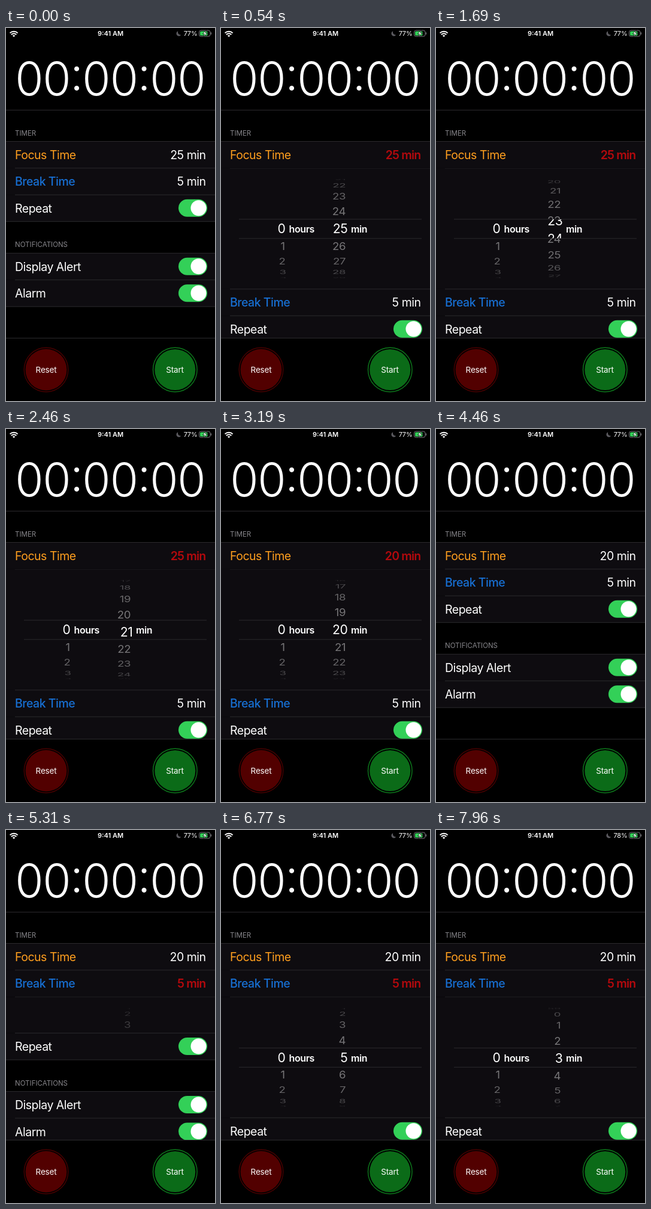
Recreate the animation shown at these times as an HTML page. Size 349 by 620 pixels, loop 8 s.

```html
<!DOCTYPE html>
<html lang="en">
<head>
<meta charset="utf-8">
<title>Focus timer</title>
<style>
  html, body { margin: 0; width: 100%; height: 100%; overflow: hidden; background: #000; }
  svg { display: block; }
  text { font-family: Inter, Roboto, sans-serif; fill: #fff; }
  .row text { font-size: 19.5px; letter-spacing: -.5px; }
  .row .red { fill: #b4090d; font-weight: 600; letter-spacing: -.8px; }
  .head { font-size: 11.5px; fill: #87868b; }
  .line { stroke: #2b2a2d; stroke-width: 1; }
  .panel { fill: #0e0c10; }
  .end { text-anchor: end; }
  .mid { text-anchor: middle; }
  .clock { font-size: 76.5px; font-weight: 300; }
  .status { font-size: 11px; font-weight: 600; }
  .btn { font-size: 13.5px; letter-spacing: -.2px; }
  .unit { font-size: 16px; font-weight: 600; letter-spacing: -.4px; }
  .dim { font-size: 18.6px; letter-spacing: -.3px; }
  .big { font-size: 21.2px; letter-spacing: -.4px; }
</style>
</head>
<body>
<svg id="stage" width="349" height="620" viewBox="0 0 349 620">
  <defs>
    <clipPath id="band"><rect y="85" width="349" height="31.5"/></clipPath>
    <clipPath id="rest"><path d="M0 18H349V84.5H0ZM0 117H349V184H0Z"/></clipPath>
    <g id="toggle">
      <rect x="288" y="8" width="48" height="29" rx="14.5" fill="#33d058"/>
      <circle cx="321.5" cy="22.5" r="13" fill="#fff"/>
    </g>
  </defs>
  <rect width="349" height="620"/>

  <g fill="none" stroke="#fff" stroke-width="2">
    <path d="M6.6 8.4A9.2 9.2 0 0 1 19.6 8.4M8.9 11A6 6 0 0 1 17.3 11"/>
    <path d="M13.1 15L10.9 12.7A3.2 3.2 0 0 1 15.3 12.7Z" fill="#fff" stroke="none"/>
  </g>
  <text class="status mid" x="174.5" y="13.3">9:41 AM</text>
  <path d="M287.3 5.2A4.2 4.2 0 1 0 292.2 11.4A4.6 4.6 0 0 1 287.3 5.2Z" fill="#5c5b60"/>
  <text class="status end" id="charge" x="319.5" y="13.3" style="font-weight:400;letter-spacing:-.2px"></text>
  <rect x="322.5" y="4" width="18.5" height="10" rx="3" fill="none" stroke="#77767b"/>
  <rect x="324" y="5.5" width="12.5" height="7" rx="1.5" fill="#33d058"/>
  <path d="M342.4 7.3V10.7" stroke="#77767b" stroke-width="1.4"/>
  <path d="M334.5 3.5L328.3 9.8H331.5L329.8 14.5L336 8.2H332.8Z" fill="#fff" stroke="#000" stroke-width=".7"/>

  <text class="clock mid" x="39 85 151 197.5 264 310" y="112">000000</text>
  <text class="clock mid" x="118 230.5" y="104">::</text>
  <path class="line" d="M0 136.5H349"/>

  <text class="head" x="15" y="179">TIMER</text>
  <g id="list"></g>

  <rect y="515" width="349" height="105"/>
  <path class="line" d="M0 515.5H349"/>
  <g fill="#520000" stroke="#480000" stroke-width="1.4">
    <circle cx="67" cy="568" r="34.5" stroke="none"/>
    <circle cx="67" cy="568" r="36.8" fill="none"/>
  </g>
  <g fill="#0b6b18" stroke="#0d7a1c" stroke-width="1.4">
    <circle cx="282.3" cy="568" r="34" stroke="none"/>
    <circle cx="282.3" cy="568" r="36.8" fill="none"/>
  </g>
  <text class="btn mid" x="67" y="573">Reset</text>
  <text class="btn mid" x="282" y="573">Start</text>
</svg>
<script>
const LOOP = 8000, ROW = 44.4, OPEN = 201, TOP = 188.5, MID = 100.8;
const RADIUS = 82, STEP = 0.36;
const NS = 'http://www.w3.org/2000/svg';
const list = document.getElementById('list');
const charge = document.getElementById('charge');

function add(parent, tag, attrs = {}, text = '') {
  const el = document.createElementNS(NS, tag);
  for (const key in attrs) el.setAttribute(key, attrs[key]);
  el.textContent = text;
  parent.appendChild(el);
  return el;
}
const move = (el, y) => el.setAttribute('transform', `translate(0 ${y.toFixed(2)})`);
const line = (parent, x, y, x2 = 349) => add(parent, 'path', { class: 'line', d: `M${x} ${y}H${x2}` });

// Progress from a to b with soft ends
function ease(t, a, b) {
  const u = Math.min(1, Math.max(0, (t - a) / (b - a)));
  return u * u * (3 - 2 * u);
}

function makeRow(label, { color = '#fff', weight = 400, toggle = false, inset = 15 } = {}) {
  const g = add(list, 'g', { class: 'row' });
  add(g, 'rect', { class: 'panel', width: 349, height: ROW });
  line(g, inset, 0);
  add(g, 'text', { x: 15, y: 29.6, style: `fill:${color};font-weight:${weight}` }, label);
  if (toggle) add(g, 'use', { href: '#toggle', y: -0.5 });
  const value = add(g, 'text', { class: 'end', x: 333.5, y: 29.6 });
  return { g, value };
}

function setValue(row, text, active) {
  row.value.textContent = text;
  row.value.setAttribute('class', active ? 'end red' : 'end');
}

function makeWheel(parent, right, bigRight, size, wraps) {
  const outer = add(add(parent, 'g', { 'clip-path': 'url(#rest)' }), 'g');
  const inner = add(add(parent, 'g', { 'clip-path': 'url(#band)' }), 'g');
  const cells = [];
  for (let i = -4; i <= 4; i++) {
    cells.push({
      i,
      dim: add(outer, 'text', { class: 'dim end' }),
      big: add(inner, 'text', { class: 'big end' })
    });
  }
  return pos => {
    const base = Math.round(pos);
    for (const { i, dim, big } of cells) {
      const n = base + i, d = n - pos, angle = d * STEP;
      const shown = wraps || (n >= 0 && n < size);
      const text = shown ? String((n + size) % size) : '';
      const cos = Math.max(0, Math.cos(angle));
      const y = MID + RADIUS * Math.sin(angle);
      const x = right + (wraps ? 0 : 4 * (1 - cos));
      dim.textContent = big.textContent = text;
      dim.setAttribute('transform', `translate(${x} ${y}) scale(1 ${cos}) translate(0 6.8)`);
      dim.setAttribute('opacity', 0.46 * Math.pow(cos, 0.8));
      big.setAttribute('transform', `translate(${bigRight} ${MID + 7.8 + d * 30})`);
    }
  };
}

function makePicker() {
  const box = add(list, 'svg', { width: 349, height: 0 });
  add(box, 'rect', { class: 'panel', width: 349, height: OPEN });
  line(box, 15, 0);
  const face = add(box, 'g');
  line(face, 30, 85, 335);
  line(face, 30, 117, 335);
  const hours = makeWheel(face, 106.5, 107.5, 24, false);
  const minutes = makeWheel(face, 208.3, 211.5, 60, true);
  add(face, 'text', { class: 'unit', x: 113.5, y: MID + 6.6 }, 'hours');
  add(face, 'text', { class: 'unit', x: 217, y: MID + 6.6 }, 'min');
  hours(0);
  return {
    minutes,
    place(y, height) {
      box.setAttribute('y', y);
      box.setAttribute('height', height);
      face.setAttribute('opacity', Math.sqrt(height / OPEN));
    }
  };
}

const focus = makeRow('Focus Time', { color: '#ff9f1e', inset: 0 });
const focusPicker = makePicker();
const rest = makeRow('Break Time', { color: '#176fd2', weight: 500 });
const restPicker = makePicker();
const repeat = makeRow('Repeat', { toggle: true });
const notes = add(list, 'g');
line(notes, 0, 0);
add(notes, 'text', { class: 'head', x: 15, y: 42.7 }, 'NOTIFICATIONS');
const alertRow = makeRow('Display Alert', { toggle: true, inset: 0 });
const alarm = makeRow('Alarm', { toggle: true });
const foot = add(list, 'g');
line(foot, 0, 0);

function draw(t) {
  const focusOpen = OPEN * (ease(t, 130, 430) - ease(t, 3980, 4280));
  const restOpen = OPEN * ease(t, 5202, 5502);

  setValue(focus, t < 3080 ? '25 min' : '20 min', t >= 130 && t < 3960);
  setValue(rest, '5 min', t >= 5200);
  charge.textContent = t < 7400 ? '77%' : '78%';

  focusPicker.minutes(25 - 5 * ease(t, 900, 3030));
  restPicker.minutes(5 - 3 * ease(t, 6900, 8600));

  let y = TOP;
  const put = (g, height) => { move(g, y); y += height; };
  put(focus.g, ROW);
  focusPicker.place(y, focusOpen);
  y += focusOpen;
  put(rest.g, ROW);
  restPicker.place(y, restOpen);
  y += restOpen;
  put(repeat.g, ROW);
  put(notes, 52.6);
  put(alertRow.g, ROW);
  put(alarm.g, ROW);
  put(foot, 0);
}

const start = performance.now();
function tick() {
  draw((performance.now() - start) % LOOP);
  requestAnimationFrame(tick);
}
tick();
</script>
</body>
</html>
```
